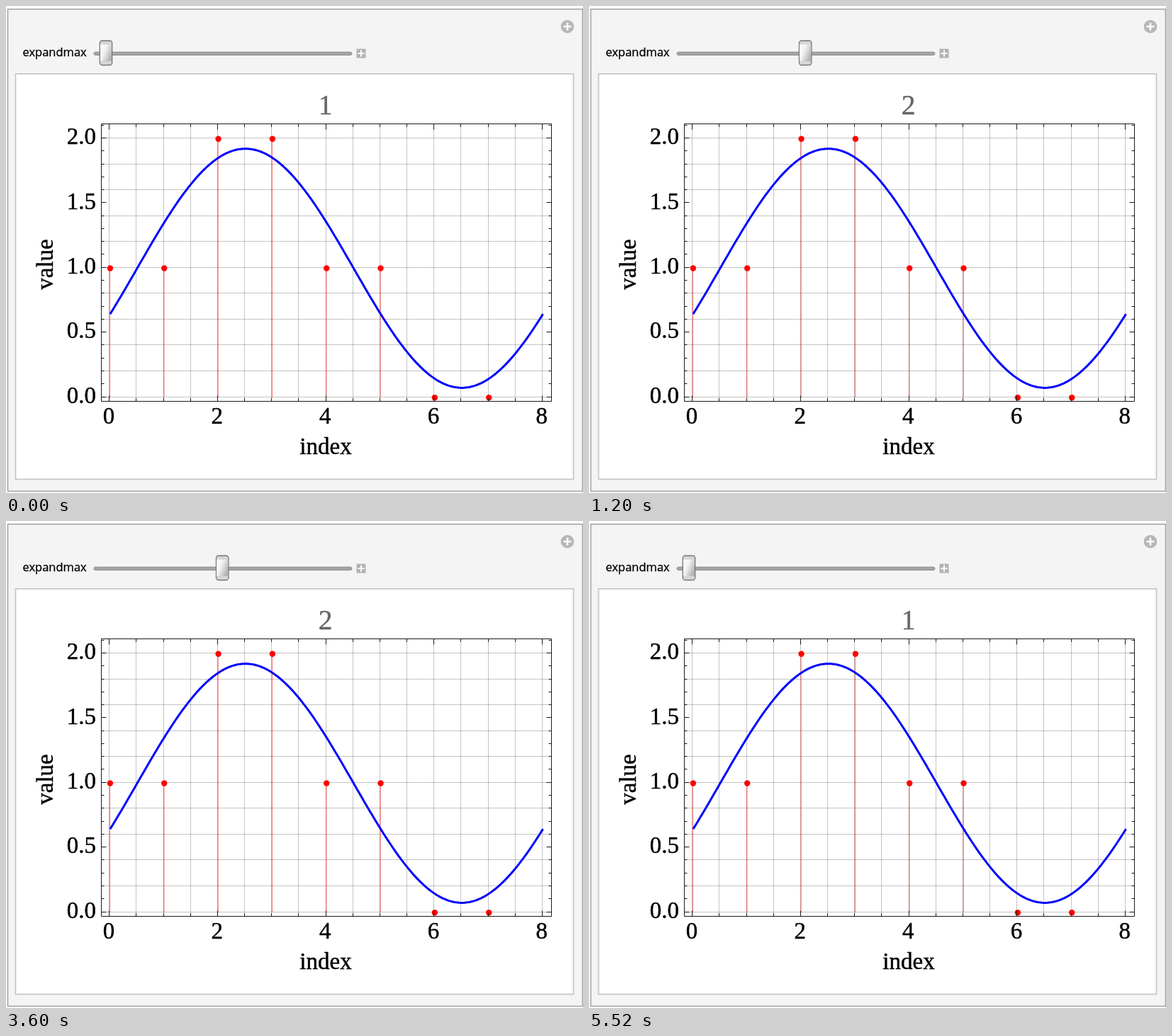
An HTML page that plays this animation: 814 by 688 pixels, repeating every 6 s.

```html
<!DOCTYPE html>
<html lang="en">
<head>
<meta charset="utf-8">
<title>Harmonic expansion</title>
<style>
  html, body { margin: 0; width: 100%; height: 100%; overflow: hidden; background: #fff; }
  svg { display: block; width: 814px; height: 688px; }
  text { stroke: #000; stroke-width: .45px; }
  .serif { font: 33px "Liberation Serif", Times, serif; }
  .title { font: 39.5px "Liberation Serif", Times, serif; fill: #666; stroke: #666; }
  .label { font: 16.5px "Open Sans", "Noto Sans", sans-serif; stroke-width: .3px; }
  .grid { stroke: #000; stroke-opacity: .23; fill: none; }
  .axis { stroke: #1a1a1a; fill: none; }
  .stem { stroke: #f01010; stroke-opacity: .5; stroke-width: 1.4; }
  .wave { stroke: #00f; stroke-width: 3; fill: none; stroke-linejoin: round; }
</style>
</head>
<body>
<svg viewBox="0 0 814 688">
  <defs>
    <linearGradient id="metal" x2="1" y2=".6">
      <stop offset="0" stop-color="#fff"/>
      <stop offset=".45" stop-color="#f2f2f2"/>
      <stop offset="1" stop-color="#b4b4b4"/>
    </linearGradient>
  </defs>
  <rect x="2.5" y="4.5" width="811" height="681" fill="#f4f4f4" stroke="#a3a3a3" stroke-width="1.6"/>
  <rect x="13.5" y="95.8" width="787" height="572.7" fill="#fff" stroke="#c3c3c3" stroke-width="1.6"/>
  <circle cx="792" cy="29" r="9.3" fill="#b7b7b7"/>
  <path d="M786.5 29h11M792 23.5v11" stroke="#fff" stroke-width="2.6"/>

  <text class="label" x="23.5" y="71">expandmax</text>
  <rect x="124" y="65" width="364" height="4.4" rx="2.2" fill="#a5a5a5" stroke="#808080" stroke-width=".8"/>
  <rect x="494.5" y="60.5" width="13" height="13" fill="#b3b3b3"/>
  <path d="M496.5 67h9M501 62.5v9" stroke="#fff" stroke-width="2"/>
  <g id="thumb">
    <rect x="-8.7" y="49" width="17.4" height="34.5" rx="3.5" fill="#d6d6d6" stroke="#777" stroke-width="1.3"/>
    <rect x="-8" y="54.5" width="16" height="23.5" fill="url(#metal)"/>
  </g>

  <text class="title" id="title" x="450.5" y="153" text-anchor="middle"></text>
  <g id="plot"></g>
  <text class="serif" x="451" y="633" text-anchor="middle">index</text>
  <text class="serif" transform="translate(66 365) rotate(-90)" text-anchor="middle">value</text>
</svg>
<script>
const LOOP = 6000, HOLD = 1200;
const STEPS = [1, 2, 3, 2, 1];
const SAMPLES = [1, 1, 2, 2, 1, 1, 0, 0];
const BOX = { left: 134.5, top: 166.5, right: 769.5, bottom: 558.5 };
// unit: pixels per value on the axis; gain: pixels per value for the data
const LOW = { unit: 182.75, mid: 369.25, gain: 182.8, base: 370.5, min: 0, max: 21 };
const HIGH = { unit: 140.6, mid: 369.5, gain: 139.6, base: 370.4, min: -3, max: 24 };

const $ = id => document.getElementById(id);
const axisX = x => 145.8 + 76.33 * x;
const dataX = x => axisX(x) + 1.1;
const snap = v => Math.floor(v) + .5;
const line = (x1, y1, x2, y2) => `M${x1} ${y1}L${x2} ${y2}`;
const path = (cls, d) => `<path class="${cls}" d="${d}"/>`;
const text = (x, y, anchor, s) =>
  `<text class="serif" x="${x}" y="${y}" text-anchor="${anchor}">${s}</text>`;

function wave(x, harmonics) {
  const a = Math.PI / 4 * (x - 2.5);
  const third = harmonics > 2 ? Math.sin(Math.PI / 8) * Math.cos(3 * a) : 0;
  return 1 + Math.cos(Math.PI / 8) * Math.cos(a) + third;
}

function chart(harmonics) {
  const s = harmonics > 2 ? HIGH : LOW;
  const axisY = v => s.mid - s.unit * (v - 1);
  const dataY = v => s.base - s.gain * (v - 1);
  let grid = '', axis = '', labels = '', stems = '', dots = '', curve = '';

  for (let i = 0; i <= 16; i++) {
    const x = snap(axisX(i / 2)), major = i % 4 === 0, len = major ? 8 : 4.5;
    grid += line(x, BOX.top, x, BOX.bottom);
    axis += line(x, BOX.top, x, BOX.top + len) + line(x, BOX.bottom, x, BOX.bottom - len);
    if (major) labels += text(axisX(i / 2) - .8, 590, 'middle', i / 2);
  }
  for (let i = 0; i <= 10; i++) {
    const y = snap(axisY(i / 5));
    grid += line(BOX.left, y, BOX.right, y);
  }
  for (let i = s.min; i <= s.max; i++) {
    const y = snap(axisY(i / 10)), major = i % 5 === 0, len = major ? 7 : 4;
    axis += line(BOX.left, y, BOX.left + len, y) + line(BOX.right, y, BOX.right - len, y);
    if (major && i >= 0) labels += text(127, axisY(i / 10) + 8.7, 'end', (i / 10).toFixed(1));
  }
  SAMPLES.forEach((v, i) => {
    const x = dataX(i), foot = x - .5;
    if (v) stems += line(foot, dataY(0), foot, dataY(v));
    dots += `<circle cx="${x}" cy="${dataY(v)}" r="4.2" fill="#f00"/>`;
  });
  for (let i = 0; i <= 160; i++) {
    const x = i / 20;
    curve += `${i ? 'L' : 'M'}${dataX(x).toFixed(2)} ${dataY(wave(x, harmonics)).toFixed(2)}`;
  }
  const { left, top, right, bottom } = BOX;
  axis += `M${left} ${top}H${right}V${bottom}H${left}Z`;
  return path('grid', grid) + path('stem', stems) + dots + path('wave', curve) +
    path('axis', axis) + labels;
}

let shown = 0;
function draw(now) {
  const n = STEPS[Math.floor(now % LOOP / HOLD)];
  if (n !== shown) {
    shown = n;
    $('title').textContent = n;
    $('thumb').setAttribute('transform', `translate(${141 + 164.2 * (n - 1)} 0)`);
    $('plot').innerHTML = chart(n);
  }
}

const start = performance.now();
function tick() {
  draw(performance.now() - start);
  requestAnimationFrame(tick);
}
tick();
</script>
</body>
</html>
```
